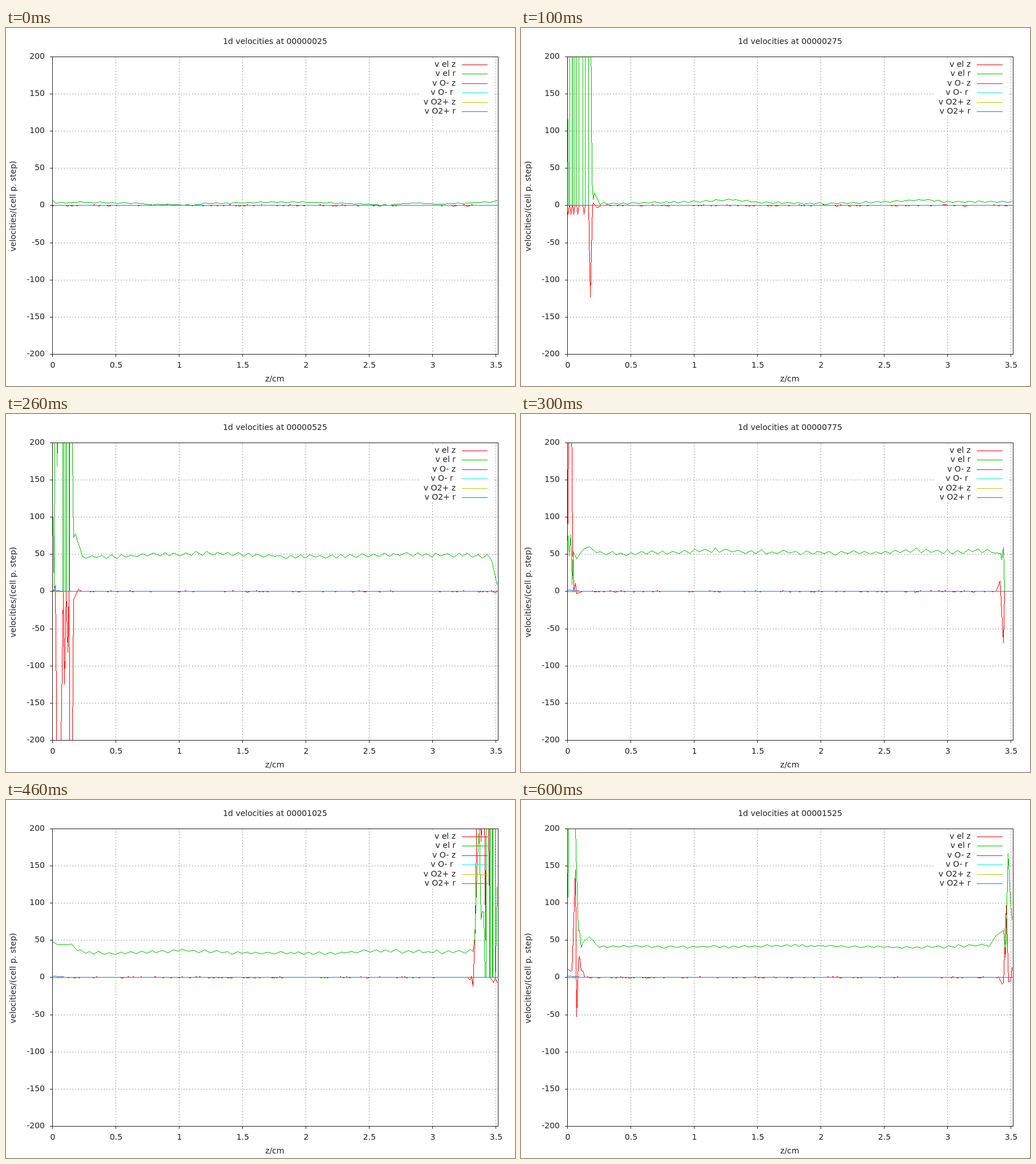
Write an HTML page with a canvas that moves like this. It is 892 by 627 pixels and loops after 0.7 s.

```html
<!DOCTYPE html>
<html lang="en">
<head>
<meta charset="utf-8">
<title>1d velocities</title>
<style>
html, body { margin: 0; width: 100%; height: 100%; overflow: hidden; background: #fff; }
canvas { display: block; }
</style>
</head>
<body>
<canvas id="plot" width="892" height="627"></canvas>
<script>
const ctx = document.getElementById("plot").getContext("2d");
const LEFT = 81, RIGHT = 862, TOP = 50, BOTTOM = 571, ZERO = 310, FIRST = 82, LAST = 860;
const STEP_MS = 100, INK = "#222", GRID = "#a0a0a0";
const SERIES = [
  ["v el z", "#ff0000"], ["v el r", "#00c000"], ["v O- z", "#c000ff"],
  ["v O- r ", "#00eeee"], ["v O2+ z", "#c8c800"], ["v O2+ r", "#4169e1"]
];

const random = n => { const v = Math.sin(n * 12.9898) * 43758.5453; return v - Math.floor(v); };

// Off-scale bursts, given as pairs of rising and falling edges.
const bursts = (...edges) => edges.flatMap((x, i) => i % 2 ? [x, 0, x, ZERO] : [x, ZERO, x, 0]);

// Small triangles of the given height standing on the zero line.
const teeth = (height, ...xs) => xs.flatMap(x => [x - 2, ZERO, x, ZERO + height, x + 2, ZERO]);

// Key points are x,y pairs in pixels. "bulk" is the mean radial electron curve, rippled by
// "ripple" pixels; the sheaths at both walls are [radial, axial] key points.
const scenes = [
  {
    bulk: [86,305, 170,305, 238,307, 250,310, 275,308, 330,310, 345,307, 490,304, 580,306,
      672,310, 680,308, 725,306, 760,308, 850,304],
    ripple: .8,
    start: [[82,302], []],
    end: [[860,302], []]
  },
  {
    bulk: [138,307, 210,306, 320,303, 370,300, 420,305, 535,307, 640,304, 702,300, 745,304, 860,304],
    ripple: 1.8,
    start: [
      [82,160, 83,310, ...bursts(85, 89, 91, 94, 97, 101, 108, 112),
        118,310, 118,0, 122,0, 124,268, 126,300, 128,288],
      [...teeth(16, 82, 87, 92, 99, 110), 118,310, 121,471, 125,310, 126,306, 133,314, 139,311]
    ],
    end: [[], []]
  },
  {
    bulk: [140,249, 190,250, 260,246, 340,243, 440,247, 530,250, 690,245, 780,247, 846,248],
    ripple: 4,
    start: [
      [82,180, 84,310, 85,0, 88,0, 89,91, 91,0, 99,0, 99,310, ...bursts(101, 104, 106, 110),
        111,310, 111,0, 115,0, 118,216, 121,209, 134,250],
      [82,310, 86,300, 88,500, 89,700, 94,700, 100,310, 102,473, 105,310, 108,417, 110,310,
        112,700, 115,700, 118,325, 126,307, 131,309]
    ],
    end: [[851,257, 860,298], [852,310, 857,313, 860,309]]
  },
  {
    bulk: [109,233, 119,233, 144,244, 200,244, 330,238, 440,242, 620,243, 690,238, 760,241, 830,238],
    ripple: 4.5,
    start: [
      [82,213, 84,248, 87,211, 89,298, 91,240, 97,253],
      [82,192, 83,0, 88,0, 90,230, 92,310, 95,296, 97,314, 106,311]
    ],
    end: [
      [840,244, 842,255, 845,233, 847,310, 860,310],
      [832,310, 839,292, 845,400, 847,310, 860,310]
    ]
  },
  {
    bulk: [104,252, 113,254, 138,267, 200,268, 300,263, 400,267, 560,268, 660,264, 780,266, 813,264],
    ripple: 3.5,
    start: [[82,248, 90,253], [82,310, 95,311]],
    end: [
      [818,265, 821,240, 826,100, 829,50, 832,209, 834,195, 837,196, 839,310,
        ...bursts(841, 847, 848, 852, 853, 857), 858,290, 860,152],
      [808,310, 813,315, 815,308, 818,326, 822,220, 825,0, 830,0, 832,72, 835,0, 838,0,
        840,245, 841,0, 844,0, 847,180, 848,0, 848,310, 854,319, 857,311, 860,319]
    ]
  },
  {
    bulk: [92,296, 200,299, 300,303, 344,300, 530,297, 600,300, 680,303, 700,300, 806,299],
    ripple: 1.2,
    start: [[82,293, 85,307], [82,293, 88,311, 92,308, 104,311]],
    end: [
      [810,283, 813,290, 815,284, 818,292, 821,240, 823,300, 825,0, 832,0, 834,310,
        ...bursts(838, 842, 843, 846, 848, 852, 853, 857), 859,285, 860,167],
      [809,309, 818,298, 821,270, 823,300, 826,0, 832,0, 834,310, ...teeth(-8, 837, 844, 849, 855),
        860,303]
    ]
  },
  {
    bulk: [137,257, 185,256, 300,257, 400,256, 480,254, 550,255, 690,258, 760,256, 808,253],
    ripple: 2.5,
    start: [
      [82,170, 84,0, 94,0, 96,90, 100,228, 102,228, 105,258, 108,249, 119,239],
      [82,296, 87,300, 89,298, 95,122, 97,379, 100,283, 102,273, 105,298, 108,299, 111,309]
    ],
    end: [
      [820,256, 832,237, 845,228, 849,275, 853,93, 857,170, 860,209],
      [836,309, 843,322, 845,320, 850,184, 854,318, 858,316, 860,293]
    ]
  }
];

function valueAt(pts, x) {
  let i = 2;
  while (i < pts.length - 2 && pts[i] < x) i += 2;
  const [x0, y0, x1, y1] = pts.slice(i - 2, i + 2);
  return y0 + (y1 - y0) * (x - x0) / (x1 - x0);
}

// Alternating crests and troughs of random size along the mean curve.
function rippled(mean, size, seed) {
  const pts = [], to = mean.at(-2);
  for (let x = mean[0], i = 1; x <= to; i++) {
    const r = random(i + seed * 211), sign = i % 2 ? 1 : -1;
    pts.push(Math.round(x), Math.min(ZERO, Math.round(valueAt(mean, x) + sign * size * (.2 + .8 * r))));
    x += 6 + 6 * random(i + seed * 97);
  }
  return pts;
}

// Faint noise of the axial electron velocity around zero.
function jitter(from, to, seed) {
  const pts = [];
  for (let x = from, i = 1; x < to; x += 2.77, i++) {
    const r = random(i + seed * 401);
    pts.push(Math.round(x), ZERO + (r > .97 ? 2 : r > .85 ? 1 : r < .04 ? -1 : 0));
  }
  return pts;
}

// Ion velocity that drifts from zero only next to the left wall.
const ion = (drift, reach) => [FIRST, ZERO + drift, FIRST + reach, ZERO, LAST, ZERO];

function curves({ bulk, ripple, start, end }, index) {
  const from = start[1].at(-2) ?? FIRST, to = end[1][0] ?? LAST;
  return [
    [...start[1], ...jitter(from, to, index), ...end[1]],
    [...start[0], ...rippled(bulk, ripple, index), ...end[0]],
    ion(0, 1),
    ion(0, 1),
    ion(index > 1 ? 1 : 0, 36),
    ion(-Math.max(0, Math.min(2, index - 1)), 26)
  ];
}

const box = (x, y, w, h, color) => { ctx.fillStyle = color; ctx.fillRect(x, y, w, h); };

// Crisp polyline, one pixel wide.
function trace(pts, color) {
  for (let i = 2; i < pts.length; i += 2) {
    const x = pts[i - 2], y = pts[i - 1], dx = pts[i] - x, dy = pts[i + 1] - y;
    const n = Math.max(Math.abs(dx), Math.abs(dy), 1);
    for (let k = 0; k <= n; k++)
      box(Math.round(x + dx * k / n), Math.round(y + dy * k / n), 1, 1, color);
  }
}

function text(str, x, y, align = "center") {
  ctx.fillStyle = INK;
  ctx.textAlign = align;
  ctx.fillText(str, x, y);
}

function drawAxes() {
  for (let k = 0; k <= 8; k++) {
    const y = Math.floor(TOP + k * 65.125 + .4);
    for (let x = LEFT; x < RIGHT; x += 5) box(x, y, 2, 1, GRID);
    box(LEFT - 4, y, 4, 1, INK);
    text(200 - k * 50, 68, y + 4, "right");
  }
  for (let k = 0; k <= 7; k++) {
    const x = LEFT + k * 111;
    for (let y = TOP; y < BOTTOM; y += 5) box(x, y, 1, 2, GRID);
    box(x, BOTTOM, 1, 5, INK);
    text(k / 2, x + 1, 595);
  }
  box(725, 55, 128, 99, "#fff");
  text("z/cm", 471, 619);
  ctx.save();
  ctx.translate(17, 312);
  ctx.rotate(-Math.PI / 2);
  text("velocities/(cell p. step)", 0, 0);
  ctx.restore();
}

function draw(index) {
  box(0, 0, 892, 627, "#fff");
  ctx.font = '14px "DejaVu Sans", Verdana, sans-serif';
  drawAxes();
  text("1d velocities at " + String(25 + 250 * index).padStart(8, "0"), 471.5, 28);
  ctx.save();
  ctx.beginPath();
  ctx.rect(LEFT, TOP, RIGHT - LEFT, BOTTOM - TOP);
  ctx.clip();
  curves(scenes[index], index).forEach((pts, i) => {
    const [label, color] = SERIES[i], y = Math.round(63.5 + i * 16.5);
    text(label, 788, y + 4, "right");
    trace(pts, color);
    box(799, y, 45, 1, color);
  });
  ctx.restore();
  ctx.strokeStyle = INK;
  ctx.strokeRect(LEFT + .5, TOP + .5, RIGHT - LEFT, BOTTOM - TOP);
}

let shown = -1;
const begin = performance.now();
function tick() {
  const index = Math.floor((performance.now() - begin) / STEP_MS) % scenes.length;
  if (index !== shown) draw(shown = index);
  requestAnimationFrame(tick);
}
tick();
</script>
</body>
</html>
```
